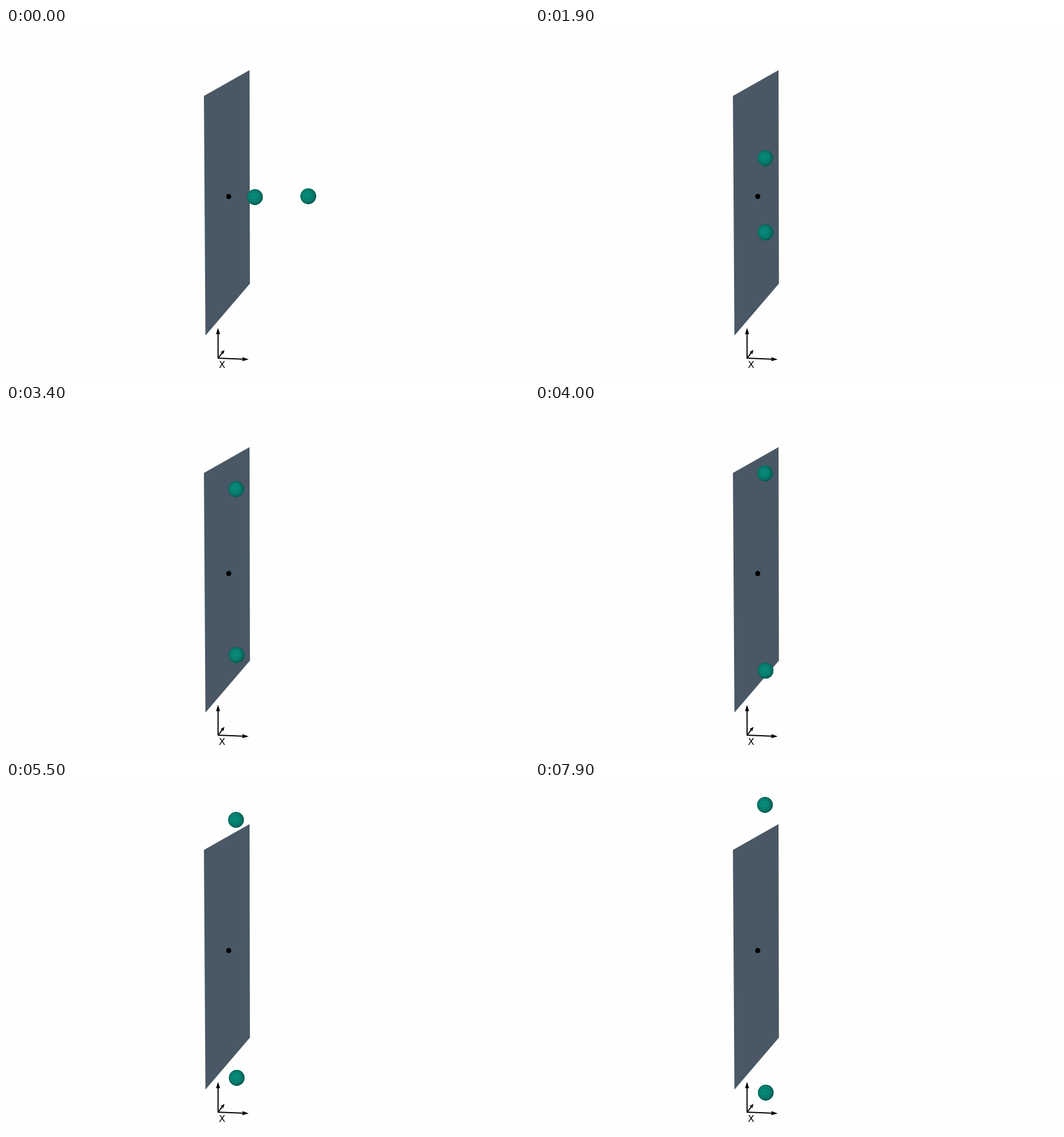
Animation, 917 px wide and 611 px high, one loop 8000 ms. Source, as an HTML page with a canvas:

```html
<!DOCTYPE html>
<html lang="en">
<head>
<meta charset="utf-8">
<title>Two spheres at a wall</title>
<style>
html, body { margin: 0; width: 100%; height: 100%; overflow: hidden; background: #fefefe; }
canvas { display: block; }
</style>
</head>
<body>
<canvas id="stage" width="917" height="611"></canvas>
<script>
const ctx = document.getElementById('stage').getContext('2d');
const LOOP = 8000, STEP = 100;
const RADIUS = 13.8, CONTACT = 29;      // sphere size, distance at which they touch
const WALL_X = 403.9, SPEED = 115;      // resting place at the wall, approach in px/s
const SWING = 253, RATE = 0.2342, DELAY = 0.79;

// Both spheres run to the wall; contact pushes them apart, then they swing outwards
function spheres(t) {
  const run = x => Math.max(WALL_X, x - SPEED * t);
  const leadX = run(436.5), chaseX = run(530), dx = chaseX - leadX;
  const squeeze = Math.sqrt(Math.max(0, CONTACT ** 2 - dx ** 2)) / 2;
  const slide = SWING * Math.sin(RATE * (t - DELAY));
  const d = Math.max(0.7, squeeze, slide);
  const midY = 293.2 + 0.026 * ((leadX + chaseX) / 2 - WALL_X);
  // Slight perspective: the upper half looks longer and leans left
  const place = (x, side) => [x + side * d * 0.0027, midY + d * (side - 0.005)];
  return [place(leadX, 1), place(chaseX, -1)];
}

function polygon(points, color) {
  ctx.beginPath();
  points.forEach(([x, y]) => ctx.lineTo(x, y));
  ctx.closePath();
  ctx.fillStyle = color;
  ctx.fill();
}

function disc(x, y, r, color) {
  ctx.beginPath();
  ctx.arc(x, y, r, 0, 2 * Math.PI);
  ctx.fillStyle = color;
  ctx.fill();
}

// Flat-shaded facets of a unit sphere, facing the viewer
function makeFacets(rows, cols, tilt, turn) {
  const c = Math.cos(tilt), s = Math.sin(tilt), facets = [];
  const point = (row, col) => {
    const lat = Math.PI * (row / rows - 0.5), lon = 2 * Math.PI * col / cols + turn;
    const x = Math.cos(lat) * Math.sin(lon), y = Math.sin(lat), z = Math.cos(lat) * Math.cos(lon);
    return [x, y * c - z * s, y * s + z * c];
  };
  for (let r = 0; r < rows; r++) {
    for (let k = 0; k < cols; k++) {
      const n = point(r + 0.5, k + 0.5);
      if (n[2] < 0.05) continue;
      const light = Math.min(1, Math.max(0, n[2] * 0.97 - n[0] * 0.16 - n[1] * 0.1));
      const shade = 0.62 + 0.38 * light;
      const color = `rgb(${[9, 139, 123].map(v => Math.round(v * shade))})`;
      const corners = [[r, k], [r, k + 1], [r + 1, k + 1], [r + 1, k]].map(([a, b]) => point(a, b));
      facets.push({ corners, color });
    }
  }
  return facets;
}
const facets = makeFacets(8, 14, 0.12, 0.12);

function ball([x, y]) {
  ctx.save();
  disc(x, y, RADIUS, '#066a5e');
  ctx.clip();
  ctx.lineWidth = 0.6;
  for (const { corners, color } of facets) {
    polygon(corners.map(p => [x + p[0] * RADIUS, y + p[1] * RADIUS]), color);
    ctx.strokeStyle = color;
    ctx.stroke();
  }
  ctx.restore();
}

function arrow(x0, y0, x1, y1, head, half) {
  const len = Math.hypot(x1 - x0, y1 - y0), ux = (x1 - x0) / len, uy = (y1 - y0) / len;
  const bx = x1 - ux * head, by = y1 - uy * head;
  ctx.beginPath();
  ctx.moveTo(x0, y0);
  ctx.lineTo(bx, by);
  ctx.strokeStyle = '#000';
  ctx.lineWidth = 2;
  ctx.stroke();
  polygon([[x1, y1], [bx - uy * half, by + ux * half], [bx + uy * half, by - ux * half]], '#000');
}

function axes() {
  arrow(371.8, 578.5, 371.8, 525, 11, 3.5);
  arrow(371.5, 578, 425.5, 580.2, 11, 3.5);
  arrow(372, 578, 383, 563.5, 7, 3);
  ctx.fillStyle = '#000';
  ctx.font = '16.5px "DejaVu Sans", sans-serif';
  ctx.textAlign = 'center';
  ctx.fillText('X', 379, 595);
}

function draw(t) {
  ctx.fillStyle = '#fefefe';
  ctx.fillRect(0, 0, 917, 611);
  polygon([[347, 119], [427, 73.7], [427.7, 447.5], [349.7, 538.5]], '#495864');
  spheres(t).forEach(ball);
  disc(390.5, 295, 4.5, '#000');
  axes();
}

const start = performance.now();
function tick() {
  const ms = (performance.now() - start) % LOOP;
  draw(Math.floor(ms / STEP) * STEP / 1000);
  requestAnimationFrame(tick);
}
tick();
</script>
</body>
</html>
```
